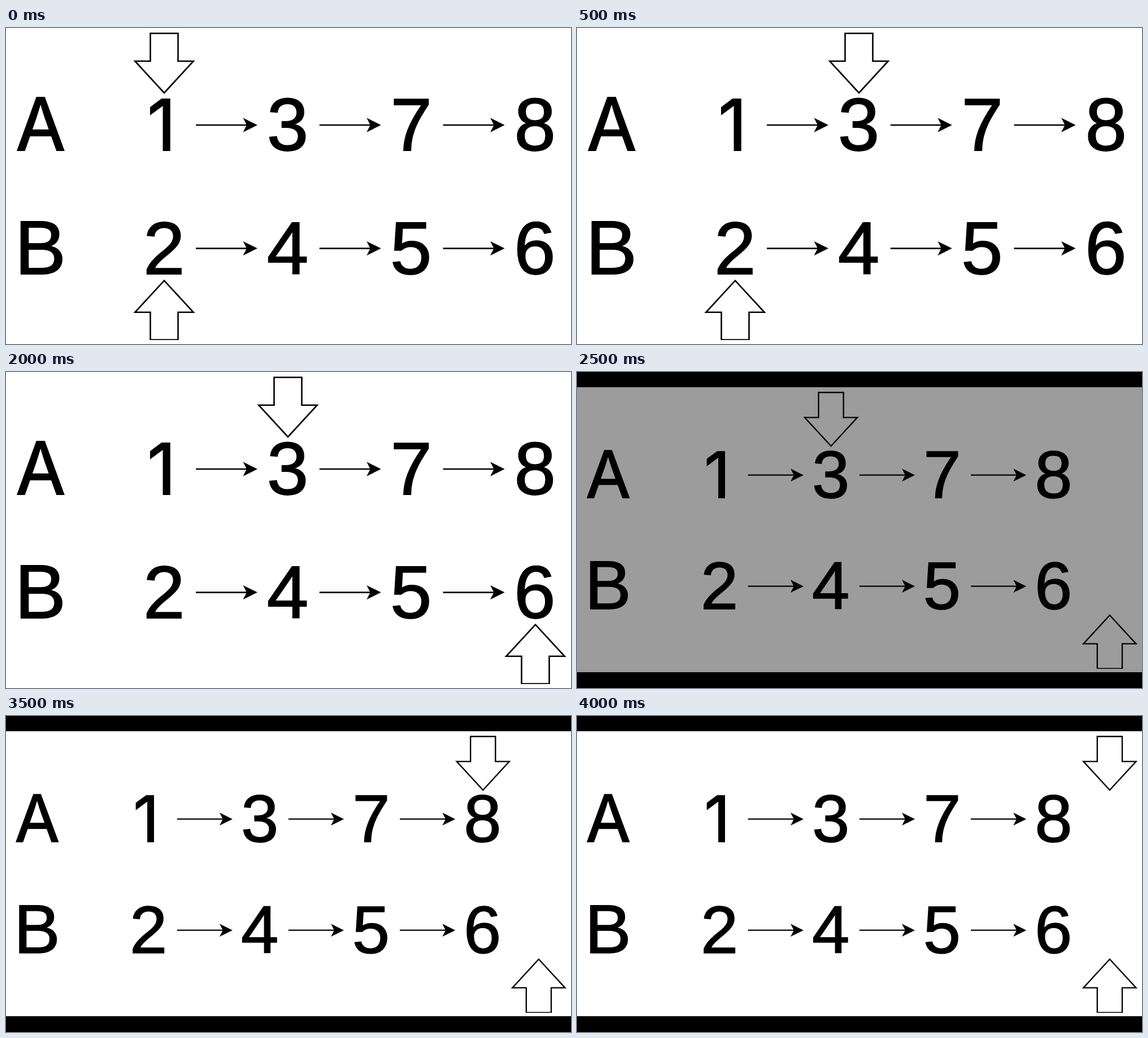
Recreate the animation shown at these times as an HTML page with a canvas. Size 1000 px wide and 560 px high, loop 4.5 s.

```html
<!DOCTYPE html>
<html lang="en">
<head>
<meta charset="utf-8">
<title>Merging two sorted lists</title>
<style>
  html, body { margin: 0; width: 100%; height: 100%; overflow: hidden; background: #fff; }
  canvas { display: block; width: 1000px; height: 560px; }
</style>
</head>
<body>
<canvas id="stage"></canvas>
<script>
const STEP_MS = 500;
const COLUMN = 218.8;
const GREY = '#9c9c9c';
const ZOOM = 0.901;

// Pointer columns for each step; 3.5 is past the end of a list.
const STEPS = [
  { top: 0, bottom: 0 },
  { top: 1, bottom: 0 },
  { top: 1, bottom: 1 },
  { top: 1, bottom: 2 },
  { top: 1, bottom: 3 },
  { top: 1, bottom: 3.5, page: GREY, bars: '#000' },
  { top: 2, bottom: 3.5, page: '#fff', bars: GREY },
  { top: 3, bottom: 3.5, page: '#fff', bars: '#000' },
  { top: 3.5, bottom: 3.5, page: '#fff', bars: '#000' }
];

const ROWS = [
  { label: 'A', digits: '1378', baseline: 217, labelX: 61.5 },
  { label: 'B', digits: '2456', baseline: 435.6, labelX: 63 }
];

const SANS = '"Liberation Sans", Arial, sans-serif';
const INTER = 'Inter, sans-serif';
const FONTS = {
  A: `128.7px ${INTER}`,
  B: `136px ${SANS}`,
  1: `125px ${INTER}`
};

const canvas = document.getElementById('stage');
const ctx = canvas.getContext('2d');
const ratio = window.devicePixelRatio || 1;
canvas.width = 1000 * ratio;
canvas.height = 560 * ratio;

// Centres the visible ink of a character on x; a thin outline adds weight.
function glyph(char, x, baseline) {
  ctx.font = FONTS[char] || `132.4px ${SANS}`;
  const ink = ctx.measureText(char);
  const left = x - (ink.actualBoundingBoxRight - ink.actualBoundingBoxLeft) / 2;
  ctx.lineWidth = 1.8;
  ctx.fillText(char, left, baseline);
  ctx.strokeText(char, left, baseline);
}

function polygon(points) {
  ctx.beginPath();
  for (const [x, y] of points) ctx.lineTo(x, y);
  ctx.closePath();
}

function link(x, y) {
  ctx.lineWidth = 2.6;
  ctx.beginPath();
  ctx.moveTo(x, y);
  ctx.lineTo(x + 92, y);
  ctx.stroke();
  polygon([[x + 109, y], [x + 83.5, y - 12.7], [x + 90, y], [x + 83.5, y + 12.7]]);
  ctx.fill();
}

function pointer(column, tip, shoulder, base) {
  const x = 280 + column * 219;
  ctx.lineWidth = 2.6;
  polygon([
    [x, tip], [x + 51.7, shoulder], [x + 24.5, shoulder], [x + 24.5, base],
    [x - 24.5, base], [x - 24.5, shoulder], [x - 51.7, shoulder]
  ]);
  ctx.stroke();
}

function drawLists({ top, bottom }) {
  ctx.fillStyle = ctx.strokeStyle = '#000';
  for (const { label, digits, baseline, labelX } of ROWS) {
    glyph(label, labelX, baseline);
    [...digits].forEach((digit, i) => {
      glyph(digit, (digit === '1' ? 272.5 : 279.5) + i * COLUMN, baseline);
      if (i < 3) link(336 + i * COLUMN, baseline - 45);
    });
  }
  pointer(top, 115, 58.7, 9.5);
  ctx.beginPath();
  ctx.rect(0, 0, 1200, 553);
  ctx.clip();
  pointer(bottom, 447.7, 503.8, 552.6);
}

function draw(now) {
  const step = STEPS[Math.floor(now / STEP_MS) % STEPS.length];
  ctx.setTransform(ratio, 0, 0, ratio, 0, 0);
  ctx.fillStyle = step.bars || '#fff';
  ctx.fillRect(0, 0, 1000, 560);
  ctx.save();
  if (step.page) {
    ctx.fillStyle = step.page;
    ctx.fillRect(0, 27, 1000, 505);
    ctx.translate(0, 27.7);
    ctx.scale(ZOOM, ZOOM);
  }
  drawLists(step);
  ctx.restore();
}

const start = performance.now();
function tick() {
  draw(performance.now() - start);
  requestAnimationFrame(tick);
}
tick();
</script>
</body>
</html>
```
